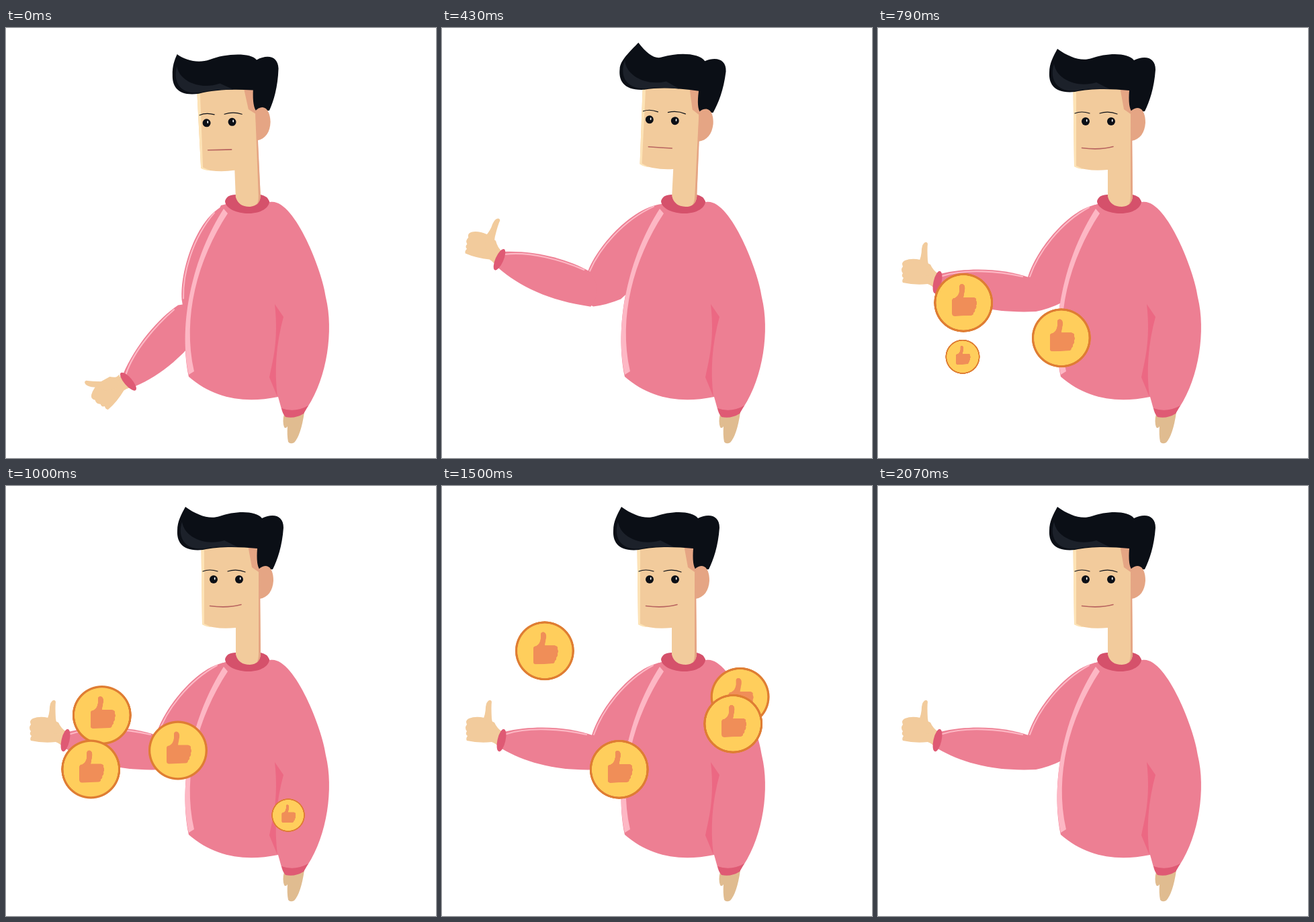
Recreate the animation shown at these times as an HTML page with a canvas. Size 640 by 640 pixels, loop 2780 ms.

```html
<!DOCTYPE html>
<html lang="en">
<head>
<meta charset="utf-8">
<title>Thumbs up</title>
<style>
html, body { margin: 0; width: 100%; height: 100%; overflow: hidden; background: #fff; }
canvas { display: block; }
</style>
</head>
<body>
<canvas id="stage" width="640" height="640"></canvas>
<script>
let ctx = document.getElementById('stage').getContext('2d');
const LOOP = 2780, LAST = 29, RAD = Math.PI / 180;
const C = {
  hair: '#0b0f16', sheen: '#1c212a', skin: '#f2cb9c', glow: '#fde3b6', shade: '#e5a584',
  knit: '#ed7f93', light: '#fdb7c4', collar: '#d5516b', cuff: '#df5a74', fold: '#ec6883',
  hand: '#e0bc90', lip: '#b8645f', coin: '#ffce5c', rim: '#df7d33', icon: '#f08e58'
};

const clamp = (v, a = 0, b = 1) => Math.min(b, Math.max(a, v));
const smooth = v => (v = clamp(v)) * v * (3 - 2 * v);

// the gesture takes ten steps: a swing that dies out, and a nod on top of it
const swing = k => (1 - clamp(k / 10)) ** 1.6 * Math.cos(25 * RAD * k);
const nod = k => Math.sin(Math.PI * clamp(k / 10) ** .8) ** 2;
const lift = k => 1 - swing(k);
const tilt = k => 3.2 * nod(k) - 2.2 * swing(k);

function fill(d, color) {
  ctx.fillStyle = color;
  ctx.fill(new Path2D(d));
}

function line(d, color, width) {
  ctx.strokeStyle = color;
  ctx.lineWidth = width;
  ctx.lineCap = 'round';
  ctx.stroke(new Path2D(d));
}

function oval(x, y, rx, ry, color, turn = 0) {
  ctx.beginPath();
  ctx.ellipse(x, y, rx, ry, turn, 0, 7);
  ctx.fillStyle = color;
  ctx.fill();
}

// draws a part turned about a joint
function joint(x, y, deg, part) {
  ctx.save();
  ctx.translate(x, y);
  ctx.rotate(deg * RAD);
  ctx.translate(-x, -y);
  part();
  ctx.restore();
}

function drawHand(p) {
  fill('M90 366Q82 361 78 352L63 345Q50 342 40 346Q34 349 37 355Q33 360 37 365Q34 369 38 372' +
       'Q35 376 37 379Q55 383 74 381Q82 384 88 392Z', C.skin);
  joint(74, 360, 33 * (p - 1), () =>
    fill('M86 370Q75 360 74 346Q73 328 74 321Q73 318 70 319Q66 321 65 329Q65 340 60 350L66 368Z', C.skin));
}

function drawArm(p) {
  joint(334, 282, 20.7 * (p - 1), () => {
    fill('M330 262C286 266 235 330 223 371L218 396Q222 418 235 422Q255 418 275 408L350 330Z', C.knit);
    line('M314 267C270 291 238 335 226 370', C.light, 2);
    joint(229, 389, 33 * (p - 1), () => {
      drawHand(p);
      fill('M224 371C190 359 138 355 92 366L89 391C125 412 172 425 235 422Q250 395 224 371Z', C.knit);
      line('M96 369C130 358 180 362 215 370', C.light, 2.2);
      oval(88.5, 378.5, 6, 17, C.cuff, 13 * RAD);
    });
  });
}

function drawBody() {
  fill('M414 574Q411 586 414 594Q416 597 419 593Q418 606 420 616Q423 620 429 617Q439 606 444 572Z', C.hand);
  fill('M328 262L320 264C285 330 254 430 272 519C310 552 355 559 405 549L410 567Q430 574 449 564' +
       'C478 520 488 450 476 401C471 361 428 252 393 259Z', C.knit);
  fill('M400 411L413 430C402 470 399 510 404 549L392 520C397 495 406 465 400 411Z', C.fold);
  fill('M324 269L330 276C285 345 262 430 280 511L272 516C256 440 278 340 324 269Z', C.light);
  fill('M410 566Q430 573 450 562L443 574Q430 582 416 579Q411 573 410 566Z', C.cuff);
  fill('M342 248Q328 248 326 258C327 269 344 276 361 276C380 276 392 267 392 258Q389 250 379 248Z', C.collar);
}

// the quiff trails the head: its tip sways most, the dip behind it less
function drawHair(h) {
  const sx = h * (h > 0 ? 4.8 : 1.8), sy = -1.9 * h, dip = Math.min(h, 0) * 3;
  fill(`M${267 + sx} ${31 + sy}C${285 + sx * .7 + dip} ${44 + sy * .4} ${303 + sx * .3 + dip} 50 ${318 + dip} 45` +
       `C${340 + dip} 37 372 36 381 48C398 40 413 44 413 62C411 90 404 110 397 124L378 125Q372 118 374 93` +
       `C345 90 315 90 293 95C262 98 254 83 255 66C255 53 ${261 + sx * .6} ${42 + sy * .5} ${267 + sx} ${31 + sy}Z`, C.hair);
  fill('M262 53C265 76 296 90 325 81L345 91C320 90 305 91 297 93C268 97 254 78 262 53Z', C.sheen);
}

function drawHead(h, smile) {
  joint(361, 255, h, () => {
    fill('M290.5 92L292 206Q314 214 342 211L342 251Q346 266 363 266Q378 265 379 250L377 88Z', C.skin);
    fill('M290.5 92L292 206Q298 210 306 210L295 205L295 92Z', C.glow);
    fill('M360 88L366 121L376 128L376 250Q376 260 372 264Q379 259 379 250L378 120L375 88Z', C.shade);
    drawHair(h);
    fill('M376 124Q381 119 387 119C395 120 398 130 398 141C397 156 390 166 377 168Z', C.shade);
    line('M293 127Q303 123 315 127', C.hair, 1.2);
    line('M330 127Q343 123 356 128', C.hair, 1.2);
    const look = 6 * (smile - 1);
    for (const x of [309, 347]) {
      oval(x + look, 139, 6, 6, C.hair);
      oval(x + look + 1.7, 137.8, .9, 2, '#fff');
    }
    line(`M303.5 ${179.5 - smile}Q${321 + 9 * smile} ${180 + 2 * smile} ${338.5 + 11.5 * smile} ${180 - 3.5 * smile}`, C.lip, 1.6);
  });
}

// one coin is painted once, so that it fades as a whole
function makeCoin() {
  const sheet = document.createElement('canvas'), main = ctx;
  sheet.width = sheet.height = 200;
  ctx = sheet.getContext('2d');
  ctx.translate(100, 100);
  ctx.scale(2, 2);
  oval(0, 0, 44, 44, C.rim);
  oval(0, 0, 40.7, 40.7, C.coin);
  fill('M-17 -3Q-17 -7 -13 -7Q-7 -10 -6 -18L-6 -24Q-6 -28 -2 -28Q3 -27 2 -19L0 -8L15 -8Q20 -7 19 -3' +
       'Q21 1 19 4Q20 8 17 10Q18 13 15 15Q15 19 11 19L-13 20Q-17 20 -17 16Z', C.icon);
  ctx = main;
  return sheet;
}
const coin = makeCoin();

// each lane sends up two coins; leads are their climbs by step 14
const LANES = [
  { x: 126, floor: 512, dir: 1, leads: [171, 90.5] },
  { x: 275.5, floor: 545, dir: -1, leads: [151.5, -53] },
  { x: 420, floor: 512, dir: 1, leads: [22, -18] }
];
const climb = k => 22.6 * (k - 14) + 18 * smooth((k - 14) / 4);
const pop = d => Math.min(d / 39, 1.13) - .13 * smooth((d - 55) / 25);

function drawCoin(lane, d) {
  if (d <= 0 || d >= 303) return;
  const along = Math.max(0, d + (lane.dir < 0 ? 30 : 0) - 82);
  const x = lane.x + lane.dir * 14.25 * (1 - Math.cos(Math.PI * along / 160));
  const r = 50 * pop(d);
  ctx.globalAlpha = clamp((303 - d) / 36);
  ctx.drawImage(coin, x - r, lane.floor - d - r, 2 * r, 2 * r);
  ctx.globalAlpha = 1;
}

function draw(k) {
  ctx.fillStyle = '#fff';
  ctx.fillRect(0, 0, 640, 640);
  drawArm(lift(k));
  drawBody();
  drawHead(tilt(k), clamp((k - 6) / 4));
  for (const lane of LANES) {
    for (const lead of lane.leads) drawCoin(lane, lead + climb(k));
  }
}

// steps run at 14 per second, rounded to 10 ms
function stepAt(t) {
  let k = LAST;
  while (k > 0 && Math.round(k * 50 / 7) * 10 > t) k--;
  return k;
}

const begin = performance.now();
function tick() {
  draw(stepAt((performance.now() - begin) % LOOP));
  requestAnimationFrame(tick);
}
tick();
</script>
</body>
</html>
```
